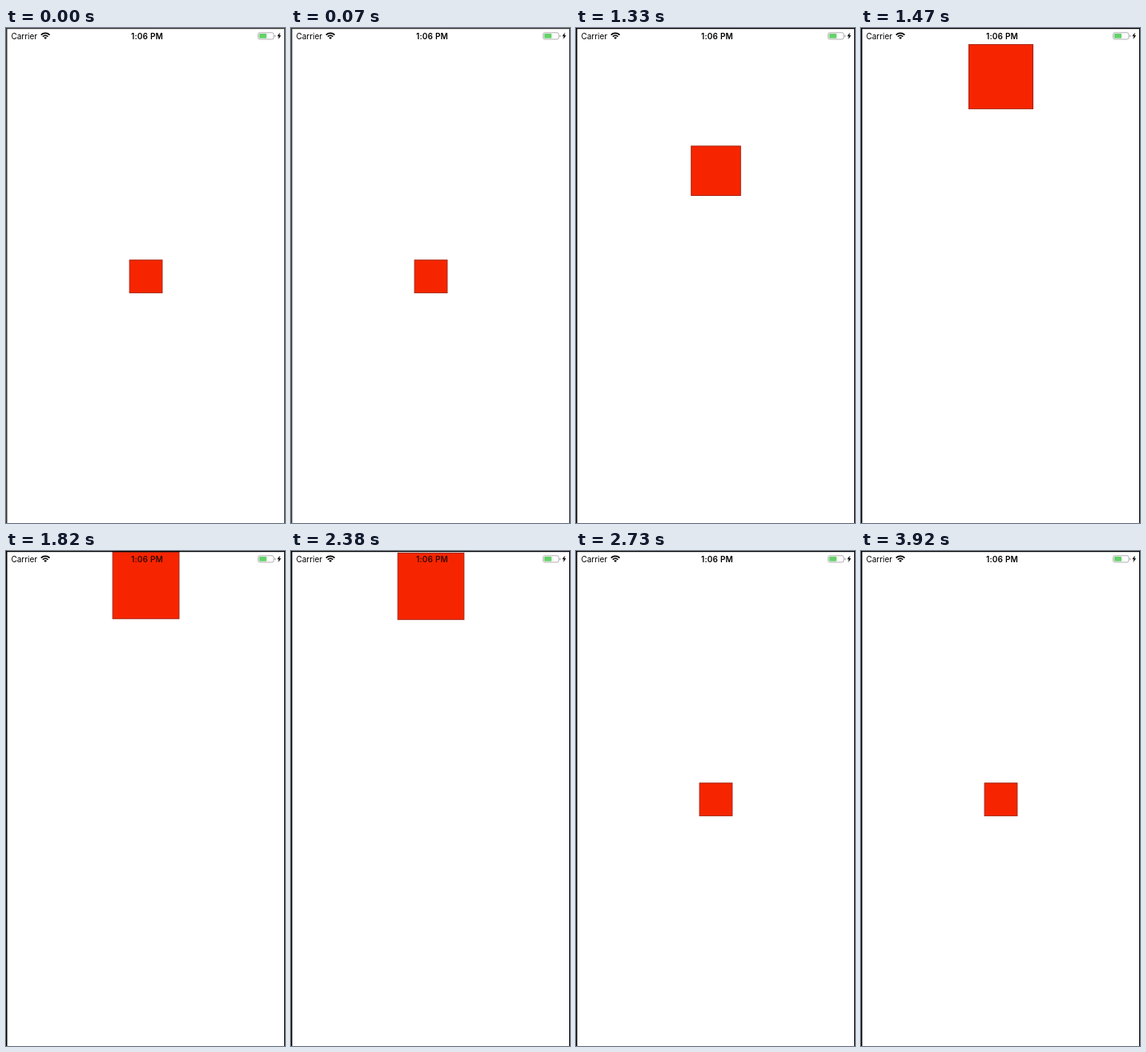
Write an HTML page that moves like this. It is 348x616 px and loops after 4.13 s.

```html
<!DOCTYPE html>
<html lang="en">
<head>
<meta charset="utf-8">
<title>Spring square</title>
<style>
  html, body { margin: 0; width: 100%; height: 100%; overflow: hidden; background: #fff; }
  svg { display: block; width: 100%; height: 100%; }
  text { font: 10px Inter, Roboto, sans-serif; }
  #clock { font-weight: 600; letter-spacing: .2px; text-anchor: middle; }
</style>
</head>
<body>
<svg viewBox="0 0 348 616">
  <rect width="348" height="616" fill="#fff"/>
  <rect id="box" fill="#f62500" stroke="#a82410"/>
  <g id="frame">
    <rect width="348" height="1.2"/>
    <rect width="1.5" height="616"/>
    <rect x="347" width="1" height="616"/>
  </g>
  <text x="6.4" y="13.8">Carrier</text>
  <g id="wifi" transform="translate(49.1 14)" fill="none" stroke="#000" stroke-width="1.7"></g>
  <text id="clock" x="176" y="13.8">1:06 PM</text>
  <rect x="314.5" y="5.8" width="19.4" height="8.2" rx="2" fill="#fff" stroke="#a6a6a6" stroke-width=".9"/>
  <rect x="315.8" y="7.1" width="9.2" height="5.6" rx=".8" fill="#66d16a"/>
  <path d="M335 8.4q1.3 .4 1.3 1.5t-1.3 1.5z" fill="#a6a6a6"/>
  <path d="M341.8 5.8L338.2 10.3H340.3L339.4 14L343.2 9.2H341.1z"/>
</svg>
<script>
const LOOP = 4130, STEP = 70;
const RISE = 1230, FALL = 2374, SETTLE = 350;
const FREQ = 15.7, DAMPING = 0.9;
const LOW = { y: 309.2, size: 41.8 }, HIGH = { y: 42.8, size: 83.8 };
const CENTER_X = 174.5;

const $ = id => document.getElementById(id);
const box = $('box'), frame = $('frame'), clock = $('clock');
const mix = (a, b, p) => a + (b - a) * p;

function setAttrs(el, attrs) {
  for (const name in attrs) el.setAttribute(name, attrs[name]);
}

// Damped spring response from 0 to 1
function spring(ms) {
  if (ms <= 0) return 0;
  if (ms >= SETTLE) return 1;
  const t = ms / 1000, decay = FREQ * DAMPING;
  const w = FREQ * Math.sqrt(1 - DAMPING ** 2);
  return 1 - Math.exp(-decay * t) * (Math.cos(w * t) + decay / w * Math.sin(w * t));
}

function arc(r) {
  const d = r * Math.SQRT1_2;
  return `M${-d} ${-d}A${r} ${r} 0 0 1 ${d} ${-d}`;
}

function draw(t) {
  const p = spring(t - RISE) - spring(t - FALL);
  const y = mix(LOW.y, HIGH.y, p), size = mix(LOW.size, HIGH.size, p);
  const top = y - size / 2, side = size - 1;
  setAttrs(box, { x: CENTER_X - side / 2, y: top + 0.5, width: side, height: side });
  frame.setAttribute('fill', t < 1050 ? '#333' : '#000');
  clock.setAttribute('fill', top < 8 ? '#3a0800' : '#000');
}

$('wifi').innerHTML =
  `<path d="${arc(4.6)}"/><path d="${arc(7.6)}"/>` +
  `<path d="${arc(2.7)}L0 0z" fill="#000" stroke="none"/>`;

const start = performance.now();
function tick() {
  const t = (performance.now() - start) % LOOP;
  draw(Math.floor(t / STEP) * STEP);
  requestAnimationFrame(tick);
}
tick();
</script>
</body>
</html>
```
